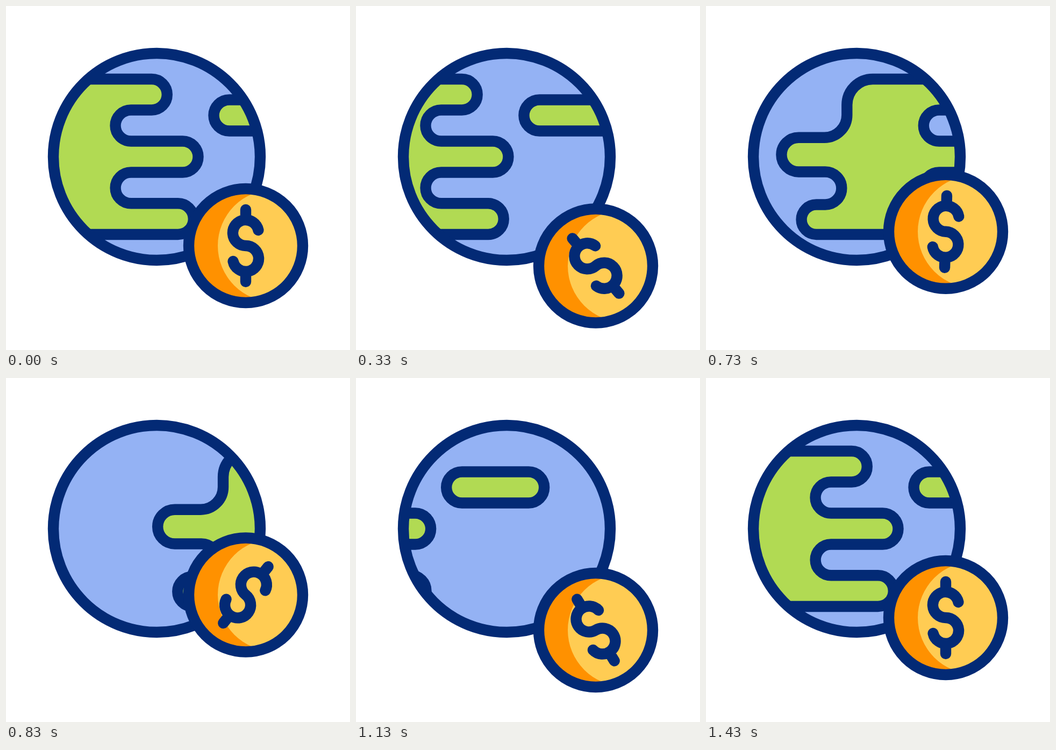
Animation, 640 px wide and 640 px high, one loop 2 s. Source, as an HTML page:

```html
<!DOCTYPE html>
<html lang="en">
<head>
<meta charset="utf-8">
<title>Globe and coin</title>
<style>
  html, body { margin: 0; width: 100%; height: 100%; overflow: hidden; background: #fff; }
  svg { display: block; width: 100%; height: 100%; }
  .line { stroke: #032a75; stroke-width: 20.4; stroke-linecap: round; stroke-linejoin: round; }
  .none { fill: none; }
  .sea { fill: #94b2f4; }
  .land { fill: #b1da53; }
  .gold { fill: #ffcc53; }
  .shade { fill: #ff9100; }
</style>
</head>
<body>
<svg viewBox="0 0 640 640">
  <defs>
    <clipPath id="globeClip"><circle cx="280.5" cy="280.5" r="197"/></clipPath>
    <clipPath id="coinClip"><circle cx="446" cy="446" r="106"/></clipPath>
    <g id="map" class="line land">
      <path d="M109 136H271a28.75 28.75 0 0 1 0 57.5H232.5a29 29 0 0 0 0 58H328.5a29 29 0 0 1 0 58
        H232.5a28.9 28.9 0 0 0 0 57.8H320a28.85 28.85 0 0 1 0 57.7H4a27.75 27.75 0 0 1 0-55.5H20.5
        a30.5 30.5 0 0 0 0-61H-29a31.9 31.9 0 0 1 0-63.8H19a42 42 0 0 0 42-42V184a48 48 0 0 1 48-48Z"/>
      <rect x="386.5" y="174.5" width="182" height="58" rx="29"/>
    </g>
  </defs>

  <circle class="sea" cx="280.5" cy="280.5" r="192.5"/>
  <g clip-path="url(#globeClip)">
    <use id="mapOut" href="#map"/>
    <use id="mapIn" href="#map"/>
  </g>
  <circle class="line none" cx="280.5" cy="280.5" r="192.5"/>

  <g id="coin">
    <g clip-path="url(#coinClip)">
      <circle class="shade" cx="446" cy="446" r="106"/>
      <circle class="gold" cx="498.5" cy="446" r="104.5"/>
    </g>
    <circle class="line none" cx="446" cy="446" r="106"/>
    <path id="sign" class="line none" d="M446 379V398M469.4 417A24 24 0 1 0 446 446A24 24 0 1 1 422.6 475M446 494V513"/>
  </g>
</svg>
<script>
  const LOOP = 2000, FPS = 30;
  // Tracks: [step, value] keys, eased in and out between neighbours
  const tracks = {
    mapOut: [[0, 0], [12, -80], [12.6, -80], [33.6, 587]],
    mapIn: [[21, -598], [43, 0]],
    drop: [[0, 0], [14, 46.8], [25, -42.5], [34, 23], [40, 0]],
    spin: [[0, 0], [14, -50.3], [40, 180]]
  };

  function valueAt(keys, n) {
    if (n <= keys[0][0]) return keys[0][1];
    for (let i = 1; i < keys.length; i++) {
      const [a, from] = keys[i - 1], [b, to] = keys[i];
      if (n < b) {
        const t = (n - a) / (b - a);
        return from + (to - from) * t * t * (3 - 2 * t);
      }
    }
    return keys[keys.length - 1][1];
  }

  const move = (id, transform) => document.getElementById(id).setAttribute('transform', transform);

  function draw(ms) {
    // Motion advances in whole steps; 4 ms absorbs timer rounding
    const n = Math.floor((ms % LOOP + 4) * FPS / 1000);
    const at = name => valueAt(tracks[name], n);
    // The outgoing map is off the globe once its track ends
    move('mapOut', `translate(${at('mapOut')})`);
    move('mapIn', `translate(${at('mapIn')})`);
    move('coin', `translate(0 ${at('drop')})`);
    move('sign', `rotate(${at('spin')} 446 446)`);
  }

  const start = performance.now();
  function tick() {
    draw(performance.now() - start);
    requestAnimationFrame(tick);
  }
  tick();
</script>
</body>
</html>
```
